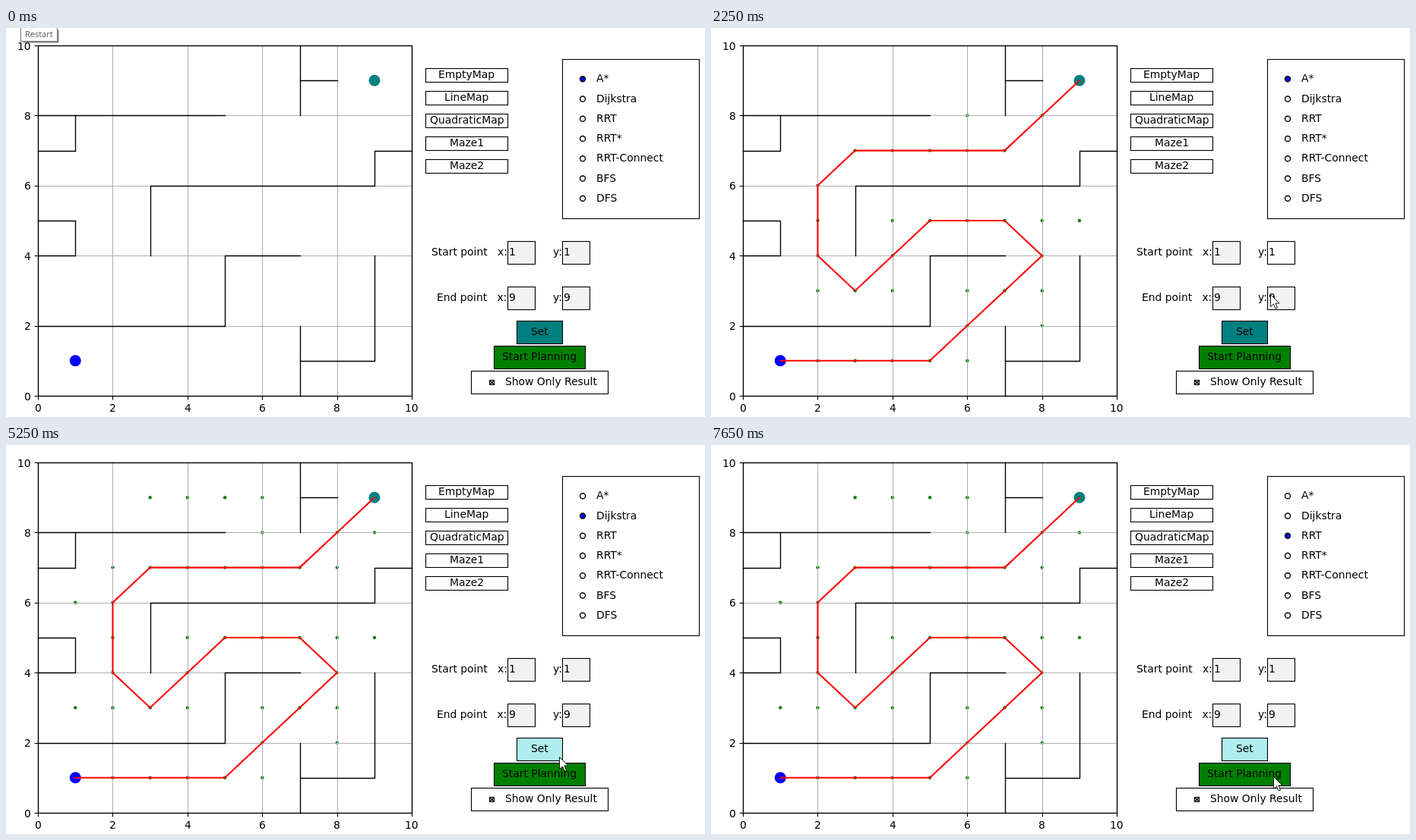
An HTML page with a canvas that plays this animation: 920 px wide and 513 px high, repeating every 8 s.

```html
<!DOCTYPE html>
<html lang="en">
<head>
<meta charset="utf-8">
<title>Path planning</title>
<style>
html, body { margin: 0; width: 920px; height: 513px; overflow: hidden; background: #fff; }
canvas { display: block; }
</style>
</head>
<body>
<canvas id="stage" width="920" height="513"></canvas>
<script>
const ctx = document.getElementById('stage').getContext('2d');
const LOOP = 8000, STEP = 50;
const FONT = '13.89px "DejaVu Sans", sans-serif';

// Plot coordinates to pixels; snap gives crisp one-pixel lines
const px = v => 42.05 + 49.21 * v;
const py = v => 485 - 46.2 * v;
const snap = v => Math.round(v) + 0.5;

// Polylines as digit pairs; "a" stands for 10
const walls = [
  '08 58', '07 17 18', '34 36 96 97 a7', '05 15 14 04',
  '02 52 54 74', '72 70', '71 91 94', '7a 78', '79 89'
].map(s => s.split(' ').map(p => [...p].map(c => parseInt(c, 16))));

const START = [1, 1], GOAL = [9, 9];
const dist = (a, b) => Math.hypot(a[0] - b[0], a[1] - b[1]);

// Lattice points that no wall touches
function freePoints() {
  const solid = new Set();
  for (const w of walls) {
    for (let i = 1; i < w.length; i++) {
      const n = dist(w[i - 1], w[i]);
      for (let k = 0; k <= n; k++) {
        solid.add(w[i].map((v, j) => Math.round(w[i - 1][j] + (v - w[i - 1][j]) * k / n)).join());
      }
    }
  }
  const list = [];
  for (let x = 1; x < 10; x++) {
    for (let y = 1; y < 10; y++) if (!solid.has(x + ',' + y)) list.push([x, y]);
  }
  return list;
}

// Shortest costs over eight neighbours
function solve() {
  const free = freePoints();
  const nodes = free.map(p => ({ p, cost: dist(p, START) ? Infinity : 0, from: null }));
  let changed = true;
  while (changed) {
    changed = false;
    for (const a of nodes) for (const b of nodes) {
      const d = dist(a.p, b.p);
      if (d > 1.5 || a.cost + d >= b.cost - 1e-9) continue;
      b.cost = a.cost + d;
      b.from = a;
      changed = true;
    }
  }
  const goal = nodes.find(n => !dist(n.p, GOAL));
  const route = [];
  for (let n = goal; n; n = n.from) route.unshift(n.p);
  const seen = weight => nodes
    .filter(n => n.cost + weight * dist(n.p, GOAL) <= goal.cost + 1e-6)
    .map(n => n.p);
  return { route, guided: seen(1), blind: seen(0) };
}
const plan = solve();

const maps = ['EmptyMap', 'LineMap', 'QuadraticMap', 'Maze1', 'Maze2'];
const planners = ['A*', 'Dijkstra', 'RRT', 'RRT*', 'RRT-Connect', 'BFS', 'DFS'];

// Pointer strokes: begin, end, target x and y, sideways bow
const strokes = [
  [100, 500, 774, 345, 0], [500, 650, 721, 419, 0], [650, 800, 735, 430, 0],
  [1100, 1600, 764, 300, 28],
  [1850, 2050, 745, 399, 10], [2050, 2250, 736, 351, 0], [2250, 2750, 762, 88, 18],
  [3550, 4050, 738, 421, 0],
  [5000, 5250, 728, 411, 0], [5250, 6000, 762, 119, 38],
  [6450, 7100, 720, 400, 40],
  [7200, 7650, 740, 437, 12]
];

function pointerAt(t) {
  let x = 22, y = -24;
  for (const [t0, t1, tx, ty, bow] of strokes) {
    const u = Math.min(1, Math.max(0, (t - t0) / (t1 - t0)));
    const e = u * u * (3 - 2 * u);
    x += (tx - x) * e + bow * Math.sin(Math.PI * e);
    y += (ty - y) * e;
    if (u < 1) break;
  }
  return [Math.round(x), Math.round(y)];
}

function line(points, color, width) {
  ctx.beginPath();
  points.forEach(([x, y], i) => i ? ctx.lineTo(x, y) : ctx.moveTo(x, y));
  ctx.strokeStyle = color;
  ctx.lineWidth = width;
  ctx.stroke();
}

function frameBox(x, y, w, h, width = 1.11) {
  ctx.strokeStyle = '#000';
  ctx.lineWidth = width;
  ctx.strokeRect(x + 0.5, y + 0.5, w, h);
}

function box(x, y, w, h, fill) {
  ctx.fillStyle = fill;
  ctx.fillRect(x + 0.5, y + 0.5, w, h);
  frameBox(x, y, w, h);
}

function disc(x, y, r, fill) {
  ctx.beginPath();
  ctx.arc(x, y, r, 0, 7);
  ctx.fillStyle = fill;
  ctx.fill();
}

// Text begins on a whole pixel; anchor 0 is left, 0.5 centre, 1 right
function text(s, x, y, anchor = 0) {
  ctx.font = FONT;
  ctx.fillStyle = '#000';
  ctx.fillText(s, Math.round(x - anchor * ctx.measureText(s).width), Math.round(y));
}

function button(s, x, y, w, h, fill) {
  box(x, y, w, h, fill);
  text(s, x + w / 2 + 0.5, y + h / 2 + 4, 0.5);
}

function field(label, value, x, y, fill) {
  text(label, x - 0.3, y + 19, 1);
  box(x, y, 36, 30, fill);
  text(value, x + 2, y + 19);
}

function plot(t) {
  const solved = t >= 1300;
  disc(px(1), py(1), 7.5, '#00f');
  disc(px(9), py(9), 7.5, '#008080');
  if (solved) {
    const dots = t < 5250 ? plan.guided : plan.blind;
    dots.filter(p => dist(p, START) && dist(p, GOAL))
      .forEach(([x, y]) => disc(px(x), py(y), 2.2, '#008000'));
  }
  for (let v = 0; v <= 10; v += 2) {
    const x = snap(px(v)), y = snap(py(v));
    line([[x, 23], [x, 486]], '#b0b0b0', 1.11);
    line([[42, y], [535, y]], '#b0b0b0', 1.11);
    line([[x, 485.5], [x, 490.4]], '#000', 1.11);
    line([[37.6, y], [42.5, y]], '#000', 1.11);
    text(String(v), px(v) + 0.1, 506, 0.5);
    text(String(v), 32.8, py(v) + 5.5, 1);
  }
  ctx.lineCap = 'square';
  walls.forEach(w => line(w.map(([x, y]) => [snap(px(x)), snap(py(y))]), '#000', 1.39));
  if (solved) line(plan.route.map(([x, y]) => [px(x), py(y)]), '#f00', 2.08);
  ctx.lineCap = 'butt';
  frameBox(42, 23, 492, 462, 1.39);
}

function panel(t) {
  const within = (a, b) => t >= a && t < b;
  maps.forEach((s, i) => button(s, 552, 53 + 30 * i, 108, 18, '#fff'));

  box(732, 41, 180, 210, '#fff');
  const chosen = t < 3400 ? 0 : t < 6750 ? 1 : 2;
  planners.forEach((s, i) => {
    const y = 67.25 + 26.25 * i;
    disc(759, y, 3.5, i === chosen ? '#00f' : '#fff');
    ctx.strokeStyle = '#000';
    ctx.lineWidth = 1.39;
    ctx.stroke();
    text(s, 777, y + 4);
  });

  const idle = '#f2f2f2';
  field('Start point   x:', '1', 660, 281, idle);
  field('y:', '1', 732, 281, within(1550, 4950) ? '#fff' : idle);
  field('End point   x:', '9', 660, 341, idle);
  field('y:', '9', 732, 341, idle);

  const setHot = within(5250, 5350) || t >= 7050;
  const planHot = within(1150, 1300) || within(4950, 5250);
  button('Set', 672, 386, 60, 30, setHot ? '#afeeee' : '#008080');
  button('Start Planning', 642, 419, 120, 30, planHot ? '#90ee90' : '#008000');

  box(612, 452, 180, 30, '#fff');
  box(636, 464, 6, 6, '#fff');
  line([[636.5, 464.5], [642.5, 470.5]], '#000', 1.39);
  line([[642.5, 464.5], [636.5, 470.5]], '#000', 1.39);
  text('Show Only Result', 657, 471);
}

function tooltip() {
  ctx.fillStyle = 'rgba(0,0,0,0.25)';
  ctx.fillRect(23, 3, 47, 17);
  ctx.fillStyle = 'rgba(0,0,0,0.3)';
  ctx.fillRect(22, 2, 47, 17);
  ctx.fillStyle = '#fff';
  ctx.fillRect(19, -2, 49, 20);
  ctx.strokeStyle = '#767676';
  ctx.lineWidth = 1;
  ctx.strokeRect(19.5, -1.5, 48, 19);
  ctx.font = '11px "Open Sans", "Noto Sans", sans-serif';
  ctx.fillStyle = '#575757';
  ctx.fillText('Restart', 25, 12);
}

function pointer([x, y]) {
  const shape = [[0, 0], [0, 16], [4, 12.5], [6.5, 18.5], [9, 17.5], [6.5, 11.5], [11.5, 11.5]];
  ctx.beginPath();
  shape.forEach(([dx, dy]) => ctx.lineTo(x + dx + 0.5, y + dy + 0.5));
  ctx.closePath();
  ctx.fillStyle = '#fff';
  ctx.fill();
  ctx.strokeStyle = '#000';
  ctx.lineWidth = 0.9;
  ctx.stroke();
}

function draw(now) {
  const t = Math.floor(now % LOOP / STEP) * STEP;
  ctx.fillStyle = '#fff';
  ctx.fillRect(0, 0, 920, 513);
  plot(t);
  panel(t);
  if (t < 100) tooltip();
  pointer(pointerAt(t));
}

let begin;
function frame(now) {
  if (begin === undefined) begin = now;
  draw(now - begin);
  requestAnimationFrame(frame);
}
draw(0);
requestAnimationFrame(frame);
</script>
</body>
</html>
```
